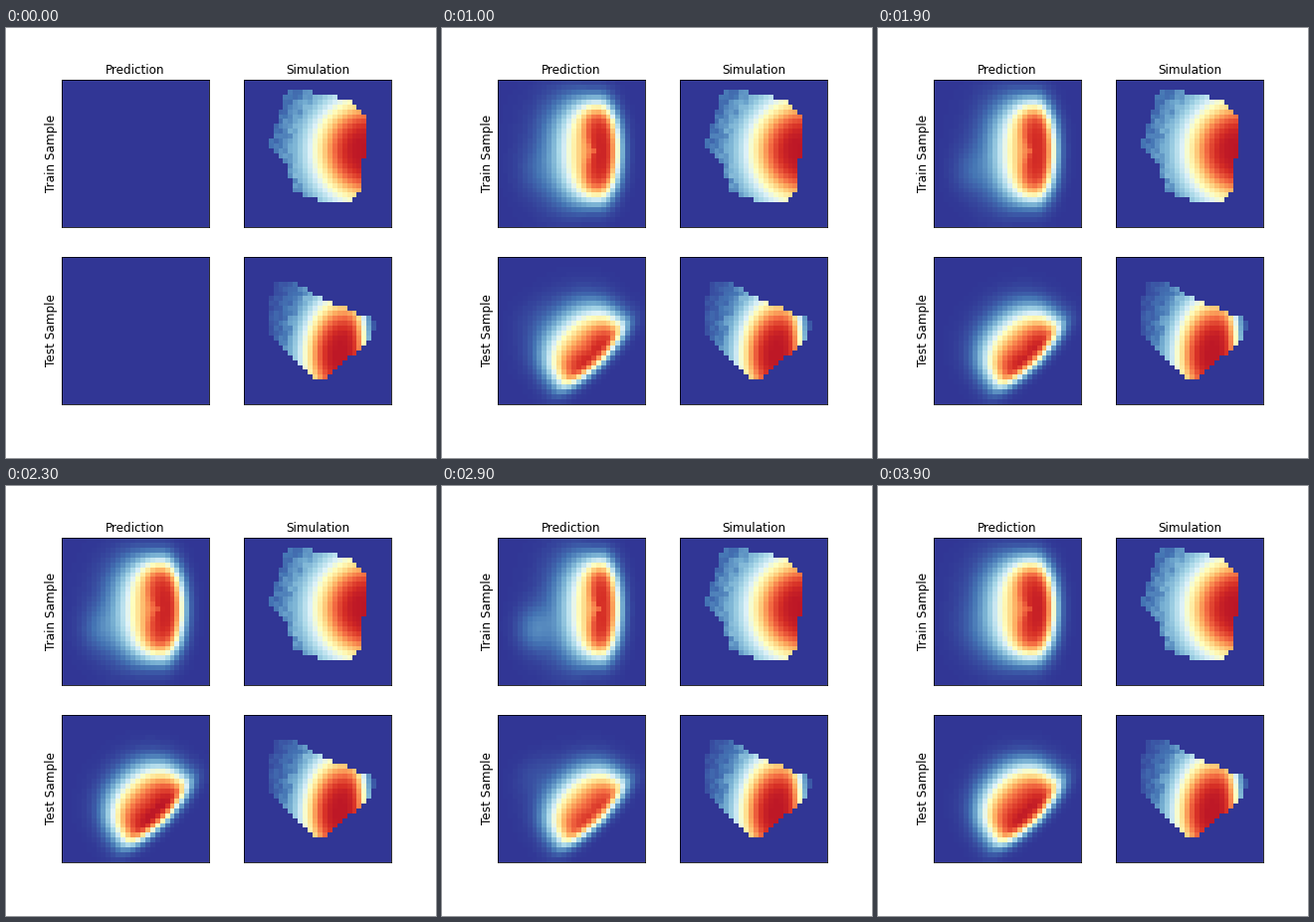
Animation, 432 px wide and 432 px high, one loop 4 s. Source, as a matplotlib script:

```python
import numpy as np
import matplotlib.pyplot as plt
from matplotlib.animation import FuncAnimation
from matplotlib.path import Path

SIZE, BOX, N, FRAMES = 432, 148, 30, 40
LEFTS, TOPS = (56, 239), (52, 230)

plt.rcParams["font.family"] = "DejaVu Sans"
X, Y = np.meshgrid(np.arange(N) + 0.5, np.arange(N) + 0.5)


def sigmoid(t):
    return 1 / (1 + np.exp(-np.clip(t, -40, 40)))


def simulation(outline, center, radii, falloff, rim, seed):
    """Radial heat profile, grainy where cold, clipped to a polygon."""
    rho = np.hypot((X - center[0]) / radii[0], (Y - center[1]) / radii[1])
    heat = 0.95 / (1 + 0.9 * rho ** falloff)
    grain = np.random.default_rng(seed).uniform(0.7, 1.2, (N, N))
    heat = np.where(rho > 1.45, heat * grain, heat) * sigmoid((rim - X) / 0.8)
    cells = np.column_stack([X.ravel(), Y.ravel()])
    return heat * Path(outline).contains_points(cells).reshape(N, N)


def train_simulation():
    outline = [(9, 2), (12, 2), (21, 4), (25, 8), (25, 16), (24, 16),
               (24, 22), (22, 25), (17, 25), (10, 23), (9, 17), (5, 14)]
    return simulation(outline, (25, 14.4), (10.2, 10.5), 3.6, 99, 4)


def test_simulation():
    outline = [(7, 5), (10, 5), (16, 8.6), (27, 13), (27, 14), (25, 17.5),
               (16, 25), (14, 25), (9, 19.5), (5, 16), (5, 11), (6, 6)]
    return simulation(outline, (20.4, 19.8), (7.7, 11), 4, 24.8, 9)


# Predictions: a blob with a soft left and a sharp right edge, turned by angle.
# The tracks give its shape at a few moments of the loop.
KEYS = [6, 14, 23, 29, 35, 39]
TRAIN = dict(
    angle=0, right=24.4, top=5, bottom=24, hub=0.58, sharp=0.8,
    left=[12.2, 15.2, 13.2, 15.2, 12.9, 12.9],
    soft=[3.0, 2.4, 2.5, 2.5, 2.4, 2.6],
    peak=[.95, .89, .92, .90, .96, .93],
    halo=[.03, .04, .07, .11, .03, .02])
TEST = dict(
    angle=np.pi / 4, right=23.5, top=7.2, bottom=23.7, hub=0.75, sharp=0.6,
    left=[12.6, 15.0, 13.2, 14.2, 12.6, 12.8],
    soft=[2.2, 2.2, 1.8, 1.8, 1.7, 1.7],
    peak=[.93, .90, .95, .88, .97, .94],
    halo=[0.03, 0, 0, .03, .01, 0])


def prediction(blob, frame):
    left, soft, peak, halo = (np.interp(frame, KEYS, blob[name])
                              for name in ("left", "soft", "peak", "halo"))
    right, top, bottom = blob["right"], blob["top"], blob["bottom"]
    c, s = np.cos(blob["angle"]), np.sin(blob["angle"])
    x = 15 + (X - 15) * c + (Y - 15) * s
    y = 15 - (X - 15) * s + (Y - 15) * c

    hub = left + blob["hub"] * (right - left)
    dx, dy = x - hub, y - (top + bottom) / 2
    width = np.where(dx < 0, hub - left, right - hub)
    height = (bottom - top) / 2
    ux, uy = np.abs(dx / width) ** 2.2, np.abs(dy / height) ** 2.2
    total = ux + uy + 1e-9

    # edge softness blends from sideways to vertical with direction
    side = np.where(dx < 0, soft, blob["sharp"]) / width
    edge = (ux * side + uy * 1.3 / height) / total + 1e-3
    heat = sigmoid((1 - total ** (1 / 2.2)) / edge)
    heat *= 1 - 0.02 * np.clip(right - x, 0, 20)

    growth = 1 - np.exp(-frame / 1.5)
    glow = halo * np.exp(-((x - 7.5) / 3.6) ** 2 - ((y - 18.5) / 4.6) ** 2)
    return growth * (peak * heat / heat.max() + glow)


fig = plt.figure(figsize=(6, 6), dpi=72, facecolor="white")


def panel(row, col):
    ax = fig.add_axes([LEFTS[col] / SIZE, 1 - (TOPS[row] + BOX) / SIZE,
                       BOX / SIZE, BOX / SIZE])
    image = ax.imshow(np.zeros((N, N)), cmap="RdYlBu_r", vmin=0, vmax=1,
                      interpolation="nearest", aspect="auto")
    ax.set_xticks([])
    ax.set_yticks([])
    if row == 0:
        ax.set_title(("Prediction", "Simulation")[col], fontsize=12)
    if col == 0:
        ax.set_ylabel(("Train Sample", "Test Sample")[row], fontsize=12)
    return image


train_image, test_image = panel(0, 0), panel(1, 0)
panel(0, 1).set_data(train_simulation())
panel(1, 1).set_data(test_simulation())


def update(frame):
    train_image.set_data(prediction(TRAIN, frame))
    test_image.set_data(prediction(TEST, frame))
    return train_image, test_image


anim = FuncAnimation(fig, update, frames=FRAMES, interval=100,
                     repeat=True, repeat_delay=0)
plt.show()
```
